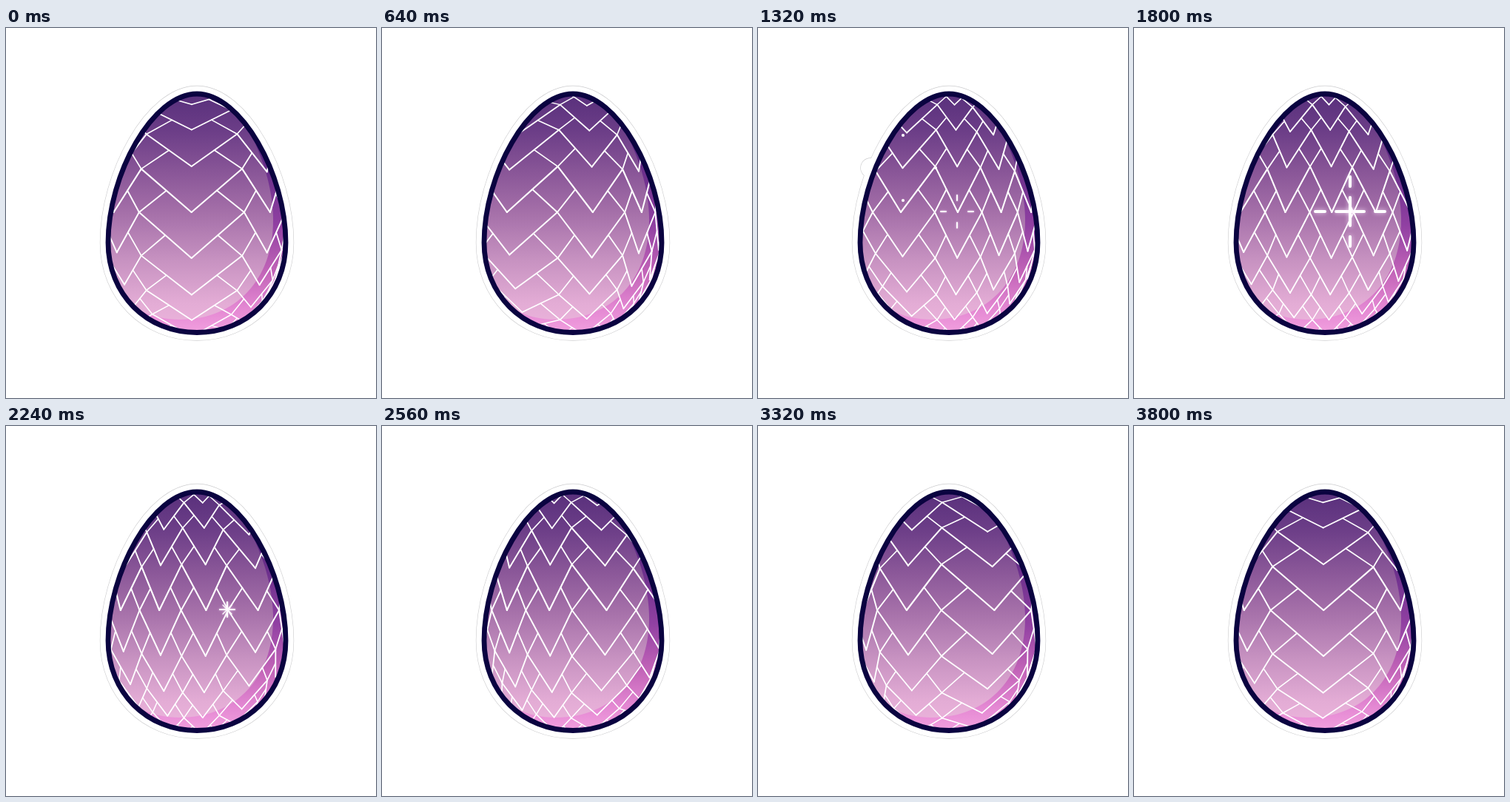
Write an HTML page with a canvas that moves like this. It is 500 by 500 pixels and loops after 3.84 s.

```html
<!DOCTYPE html>
<html lang="en">
<head>
<meta charset="utf-8">
<title>Scaled egg</title>
<style>
html, body { margin: 0; width: 100%; height: 100%; overflow: hidden; background: #fff; }
canvas { display: block; width: 500px; height: 500px; }
</style>
</head>
<body>
<canvas id="stage" width="500" height="500"></canvas>
<script>
const ctx = document.getElementById('stage').getContext('2d');
const LOOP = 3840, STEP = 40, TURN = 235;
const CX = 252, CY = 249, RADIUS = 130, BULGE = 221;

const egg = new Path2D('M258 89C198 89 138 198 138 290C138 360 190 411.5 258 411.5' +
  'C326 411.5 378 360 378 290C378 198 318 89 258 89Z');
const light = new Path2D('M290 90C331 125 361 200 361 260C361 340 310 394 235 394' +
  'C195 394 165 378 150 350L132 290C145 230 160 175 192 130C212 106 230 95 258 86Z');

function gradient(stops) {
  const g = ctx.createLinearGradient(0, 90, 0, 410);
  for (const [at, color] of stops) g.addColorStop(at, color);
  return g;
}
const shade = gradient([[0, '#512478'], [0.25, '#5f2a84'], [0.55, '#9040a2'],
  [0.75, '#c264b8'], [0.9, '#e387d2'], [1, '#f19ede']]);
const skin = gradient([[0, '#59307c'], [0.15, '#6b3d87'], [0.32, '#885597'],
  [0.5, '#a570a9'], [0.7, '#c792c1'], [0.88, '#e3acd5'], [1, '#ecb4dc']]);

// Longitudes in degrees: scale tips and shoulders alternate around the shell.
const KNOTS = [-0.6, 32.5, 53.8, 75, 88.7, 103.7, 116.9, 130.3, 145.2, 158.8, 180, 201.3];
const knot = i => {
  const n = KNOTS.length, lap = Math.floor(i / n);
  return KNOTS[i - lap * n] + lap * TURN;
};
const rowHeight = k => {
  const y = 64.6 * k;
  return y / Math.hypot(1, y / BULGE);
};

function project(angle, row) {
  const a = Math.max(-90, Math.min(90, angle)) * Math.PI / 180;
  const e = RADIUS * Math.sin(a), v = rowHeight(row);
  return [CX + e * Math.sqrt(1 - (v / BULGE) ** 2), CY + v * Math.sqrt(1 - (e / BULGE) ** 2)];
}

function line(a, b, width) {
  ctx.lineWidth = width;
  ctx.beginPath();
  ctx.moveTo(...a);
  ctx.lineTo(...b);
  ctx.stroke();
}

function drawScales(t) {
  const spin = TURN * t / LOOP;
  ctx.strokeStyle = '#fff';
  ctx.lineCap = 'round';
  for (let i = -14; i < 28; i += 2) {
    const tip = knot(i) - spin;
    for (const side of [-1, 1]) {
      const shoulder = knot(i + side) - spin;
      if (Math.abs(tip) > 90 && Math.abs(shoulder) > 90) continue;
      for (let k = -4; k <= 4; k++) {
        const width = 2.1 - 0.14 * Math.abs(k);
        const low = project(tip, k), high = project(shoulder, k - 1);
        line(high, low, width);
        const middle = [(low[0] + high[0]) / 2, (low[1] + high[1]) / 2];
        line(project(shoulder, k), middle, width - 0.2);
      }
    }
  }
}

const BURSTS = [
  { start: 1060, x: 196, y: 189, reach: 46 },
  { start: 2780, x: 188, y: 139, reach: 36 }
];
function burstDots(t) {
  const dots = [];
  for (const b of BURSTS) {
    const p = (t - b.start) / 400;
    if (p <= 0 || p >= 1) continue;
    const d = b.reach * (1 - (1 - p) ** 3), r = 2.6 * Math.sin(Math.PI * p) ** 2;
    for (const [ux, uy] of [[1, 0], [-1, 0], [0, 1], [0, -1]])
      dots.push({ x: b.x + ux * d, y: b.y + uy * d, r });
  }
  return dots;
}

function disc(x, y, r, color) {
  ctx.fillStyle = color;
  ctx.beginPath();
  ctx.arc(x, y, r, 0, Math.PI * 2);
  ctx.fill();
}

// time, x, cross arm, dash start, dash end, line width, diagonal arm
const GLINT = [
  [1240, 265, 0, 4, 7, 1.4, 0],
  [1320, 269, 0, 15, 22, 1.9, 0],
  [1800, 292, 19, 34, 47, 4, 0],
  [2240, 299, 10, 10, 10, 2.2, 6],
  [2360, 301, 0, 0, 0, 1, 0]
];
function drawGlint(t) {
  const i = GLINT.findIndex((key, n) => n && t >= GLINT[n - 1][0] && t < key[0]);
  if (i < 0) return;
  const from = GLINT[i - 1], to = GLINT[i], p = (t - from[0]) / (to[0] - from[0]);
  const [, x, arm, near, far, width, diagonal] = from.map((v, n) => v + (to[n] - v) * p);
  const y = 248;
  ctx.save();
  ctx.shadowColor = 'rgba(255,235,255,0.8)';
  ctx.shadowBlur = width * 1.5;
  for (const [ux, uy] of [[1, 0], [-1, 0], [0, 1], [0, -1]]) {
    const at = d => [x + ux * d, y + uy * d];
    if (arm > 0.5) line([x, y], at(arm), width);
    if (far - near > 1) line(at(near), at(far), width);
  }
  if (diagonal > 1) for (const s of [-1, 1])
    line([x - diagonal, y - s * diagonal], [x + diagonal, y + s * diagonal], width * 0.6);
  ctx.restore();
}

function strokeEgg(width, color) {
  ctx.lineWidth = width;
  ctx.strokeStyle = color;
  ctx.stroke(egg);
}

function draw(t) {
  const dots = burstDots(t);
  ctx.fillStyle = '#fff';
  ctx.fillRect(0, 0, 500, 500);
  for (const d of dots) disc(d.x, d.y, d.r + 11.6, '#ccccce');
  strokeEgg(22.4, '#ccccce');
  for (const d of dots) disc(d.x, d.y, d.r + 11, '#fff');
  strokeEgg(21.2, '#fff');

  ctx.save();
  ctx.clip(egg);
  ctx.fillStyle = shade;
  ctx.fillRect(120, 80, 280, 350);
  ctx.fillStyle = skin;
  ctx.fill(light);
  drawScales(t);
  ctx.restore();

  strokeEgg(6.8, '#0a0340');
  for (const d of dots) disc(d.x, d.y, d.r, '#fff');
  ctx.strokeStyle = '#fff';
  ctx.lineCap = 'round';
  drawGlint(t);
}

const begin = performance.now();
function frame() {
  const t = (performance.now() - begin) % LOOP;
  draw(Math.floor(t / STEP) * STEP);
  requestAnimationFrame(frame);
}
frame();
</script>
</body>
</html>
```
